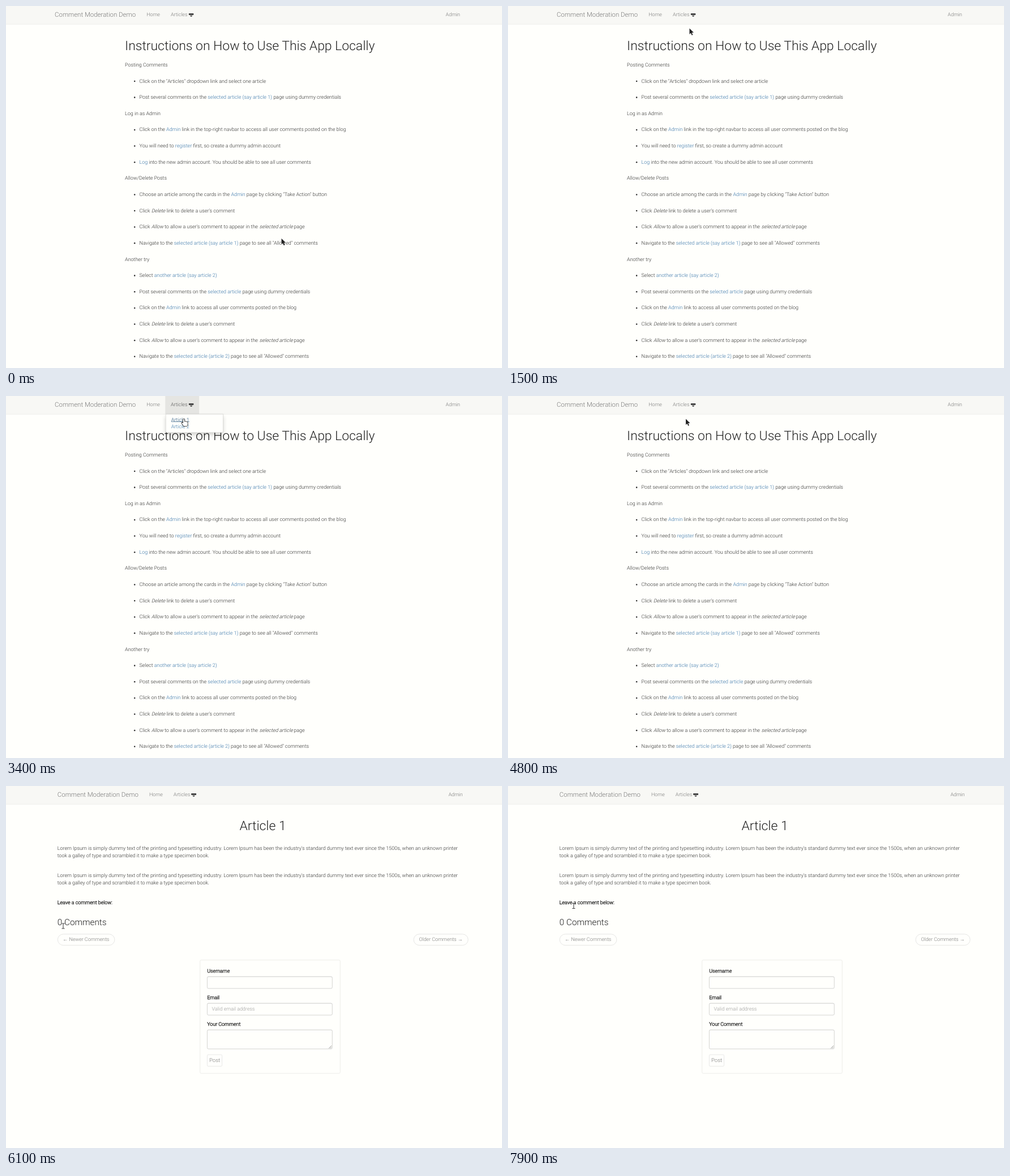
An HTML page for the animation above (8000 ms loop, 876 by 640 pixels).

```html
<!DOCTYPE html>
<html lang="en">
<head>
<meta charset="utf-8">
<title>Comment Moderation Demo</title>
<style>
* { box-sizing: border-box; }
html, body { margin: 0; width: 100%; height: 100%; overflow: hidden; background: #fffffc; }
[hidden] { display: none !important; }
#screen {
  position: absolute; left: 0; top: 0; width: 1377px; height: 1006px; overflow: hidden;
  transform: scale(.63636); transform-origin: 0 0;
  font: 300 14px/20px Roboto, "Liberation Sans", sans-serif;
  color: #2e2e2e; white-space: pre; text-rendering: geometricPrecision;
}
#screen section, .abs { position: absolute; left: 0; top: 0; }
a { color: #3573a8; }
a.hover { color: #23527c; text-decoration: underline; }
h1, h3, p, ul { margin: 0; font-weight: 300; }
h1 { position: absolute; left: 0; top: 90px; font-size: 36px; line-height: 40px; color: #222; }
em { display: inline-block; font-style: normal; transform: skewX(-14deg); transform-origin: 0 61%; }
b { font-weight: 300; color: #222; -webkit-text-stroke: .55px; }

#bar { position: absolute; left: 0; top: 0; width: 100%; height: 51px; background: #f8f8f5; border-bottom: 1px solid #e7e7e4; }
#nav { position: absolute; top: 0; width: 1140px; height: 50px; display: flex; line-height: 50px; color: #777; }
#nav span { padding: 0 15px; }
#nav .brand { font-size: 18px; padding-left: 0; }
#nav .admin { margin-left: auto; }
#articles.hover { color: #333; }
#articles.open { color: #555; background: #e5e5e2; }
#articles svg { width: 14px; height: 12px; vertical-align: -2px; fill: #444; }
#menu {
  position: absolute; left: 442.5px; top: 50px; width: 160px; height: 52px; padding: 5px 15px;
  background: #fffffc; border: 1px solid rgba(0,0,0,.17); border-radius: 0 0 4px 4px;
  box-shadow: 0 6px 12px rgba(0,0,0,.175);
}
#menu a { display: block; width: max-content; }

#rows { position: absolute; left: 330.2px; top: 142.4px; line-height: 45px; }
#rows ul { padding-left: 40px; list-style: disc; }

#screen #article { left: 142.7px; width: 1140px; height: 100%; }
#article h1 { width: 100%; text-align: center; }
#article h3 { position: absolute; left: 0; top: 365px; font-size: 24px; line-height: 26px; color: #222; }
.pill { position: absolute; top: 411px; padding: 5px 14px; border: 1px solid #d8d8d6; border-radius: 16px; color: #777; }
#form { position: absolute; left: 395.5px; top: 483px; width: 390px; height: 316px; border: 1px solid #e3e3e0; border-radius: 4px; }
#form > * { position: absolute; left: 19px; }
.field {
  width: 348px; height: 34px; padding: 6px 12px; color: #999;
  border: 1px solid #bbb; border-radius: 4px; box-shadow: inset 0 1px 1px rgba(0,0,0,.075);
}
.field svg { position: absolute; right: 1px; bottom: 1px; width: 9px; height: 9px; stroke: #666; }
.post { top: 262px; height: 33px; padding: 0 5px; font-size: 15px; line-height: 31px; color: #777; border: 1px solid #ddd; border-radius: 3px; }
#pointer { position: absolute; left: 0; top: 0; width: 100%; height: 100%; }
#cursor { paint-order: stroke; stroke-linejoin: round; }
</style>
</head>
<body>
<div id="screen">
  <section id="guide">
    <h1 style="left:330.2px">Instructions on How to Use This App Locally</h1>
    <div id="rows"><p>Posting Comments</p><ul
      ><li>Click on the "Articles" dropdown link and select one article</li
      ><li>Post several comments on the <a>selected article (say article 1)</a> page using dummy credentials</li></ul
      ><p>Log in as Admin</p><ul
      ><li>Click on the <a>Admin</a> link in the top-right navbar to access all user comments posted on the blog</li
      ><li>You will need to <a>register</a> first, so create a dummy admin account</li
      ><li><a>Log</a> into the new admin account. You should be able to see all user comments</li></ul
      ><p>Allow/Delete Posts</p><ul
      ><li>Choose an article among the cards in the <a>Admin</a> page by clicking "Take Action" button</li
      ><li>Click <em>Delete</em> link to delete a user's comment</li
      ><li>Click <em>Allow</em> to allow a user's comment to appear in the <em>selected article</em> page</li
      ><li>Navigate to the <a>selected article (say article 1)</a> page to see all "Allowed" comments</li></ul
      ><p>Another try</p><ul
      ><li>Select <a>another article (say article 2)</a></li
      ><li>Post several comments on the <a>selected article</a> page using dummy credentials</li
      ><li>Click on the <a>Admin</a> link to access all user comments posted on the blog</li
      ><li>Click <em>Delete</em> link to delete a user's comment</li
      ><li>Click <em>Allow</em> to allow a user's comment to appear in the <em>selected article</em> page</li
      ><li>Navigate to the <a>selected article (article 2)</a> page to see all "Allowed" comments</li></ul></div>
  </section>

  <section id="article" hidden>
    <h1>Article 1</h1>
    <p class="abs lorem" style="top:164.3px"></p>
    <p class="abs lorem" style="top:239.3px"></p>
    <b class="abs" style="top:314.6px">Leave a comment below:</b>
    <h3>0 Comments</h3>
    <span class="pill" style="left:0">← Newer Comments</span>
    <span class="pill" style="right:0">Older Comments →</span>
    <div id="form">
      <b style="top:20px">Username</b><div class="field" style="top:45px"></div>
      <b style="top:94px">Email</b><div class="field" style="top:119px">Valid email address</div>
      <b style="top:168px">Your Comment</b>
      <div class="field" style="top:193px;height:54px"><svg><path d="M1 9 9 1M5 9 9 5"/></svg></div>
      <span class="post">Post</span>
    </div>
  </section>

  <div id="bar"></div>
  <div id="nav"><span class="brand">Comment Moderation Demo</span><span>Home</span><span id="articles">Articles <svg><path d="M0 1.5H14V6H0ZM4 7.5H10V9L8 10.5H6L4 9Z"/></svg></span><span class="admin">Admin</span></div>
  <div id="menu" hidden><a id="first">Article 1</a><a>Article 2</a></div>
</div>
<svg id="pointer"><path id="cursor"/></svg>

<script>
const $ = id => document.getElementById(id);
const LOOP = 8000, STEP = 100;

const lorem = "Lorem Ipsum is simply dummy text of the printing and typesetting industry. " +
  "Lorem Ipsum has been the industry's standard dummy text ever since the 1500s, when an unknown printer\n" +
  "took a galley of type and scrambled it to make a type specimen book.";
document.querySelectorAll(".lorem").forEach(p => p.textContent = lorem);

const shapes = {
  arrow: { d: "M0 0V10.4L2.4 8.2 4.2 12.2 5.9 11.5 4.2 7.6H7.5Z", fill: "#222", stroke: "#fff", width: 1 },
  hand: {
    d: "M-1 7.6V1Q-1 0 0 0T1 1V5Q2 4 3 5 4 4.3 5 5.3 6.5 5 6.7 6.5V9Q6.7 10.5 5.8 12.5H-.4Q-1 10.6-3.4 8-4 6.6-2.8 6.4-2 6.4-1 7.6ZM1 5V7M3 5V7M5 5.3V7",
    fill: "#fff", stroke: "#222", width: 1.6
  },
  beam: { d: "M-2.5-5H-.5L0-4.6.5-5H2.5V-4.1H.5V4.1H2.5V5H.5L0 4.6-.5 5H-2.5V4.1H-.5V-4.1H-2.5Z", fill: "#333", stroke: "#fff", width: .8 }
};

// Each stroke: start time, then one pointer position per step.
const strokes = [
  [0, [486.5, 411]],
  [500, [484, 405], [470, 375], [441, 315], [407, 245], [380, 190], [358, 146], [341, 111], [330, 88], [325.5, 78.5]],
  [1400, [322, 58], [320.5, 39.5], [321, 27], [322, 20], [323, 16], [324, 14]],
  [2700, [323, 17], [322, 22], [321, 28], [320, 34.5]],
  [3200, [318, 37], [316, 39], [314, 40.5]],
  [5700, [270, 88], [160, 200], [102, 247.5]],
  [6100, [101, 247.5]],
  [6300, [98, 247], [94, 248], [86, 250], [91, 253], [97, 255.5]],
  [6900, [96.5, 250], [101, 247], [107, 245.5]],
  [7300, [108.5, 243], [109, 239], [107, 233], [104, 227], [102, 223.5]],
  [7900, [116, 212]]
];

function pointerAt(t) {
  const [start, ...points] = strokes.findLast(s => s[0] <= t);
  return points[Math.min(Math.floor((t - start) / STEP), points.length - 1)];
}

function shapeAt(t) {
  if (t >= 1600 && t < 4800) return shapes.hand;
  if (t >= 5900 && !(t >= 6500 && t < 6700)) return shapes.beam;
  return shapes.arrow;
}

function draw() {
  const t = performance.now() % LOOP;
  const open = t >= 2400 && t < 4800, onArticle = t >= 5300;
  $("guide").hidden = onArticle;
  $("article").hidden = !onArticle;
  $("nav").style.left = (onArticle ? 142.7 : 135.2) + "px";
  $("menu").hidden = !open;
  $("articles").className = open ? "open" : t >= 1600 && t < 2400 ? "hover" : "";
  $("first").className = open && t >= 3000 ? "hover" : "";

  const [x, y] = pointerAt(t), shape = shapeAt(t), cursor = $("cursor");
  cursor.setAttribute("d", shape.d);
  cursor.setAttribute("transform", `translate(${x} ${y})`);
  cursor.setAttribute("fill", shape.fill);
  cursor.setAttribute("stroke", shape.stroke);
  cursor.setAttribute("stroke-width", shape.width);
  requestAnimationFrame(draw);
}
draw();
</script>
</body>
</html>
```
